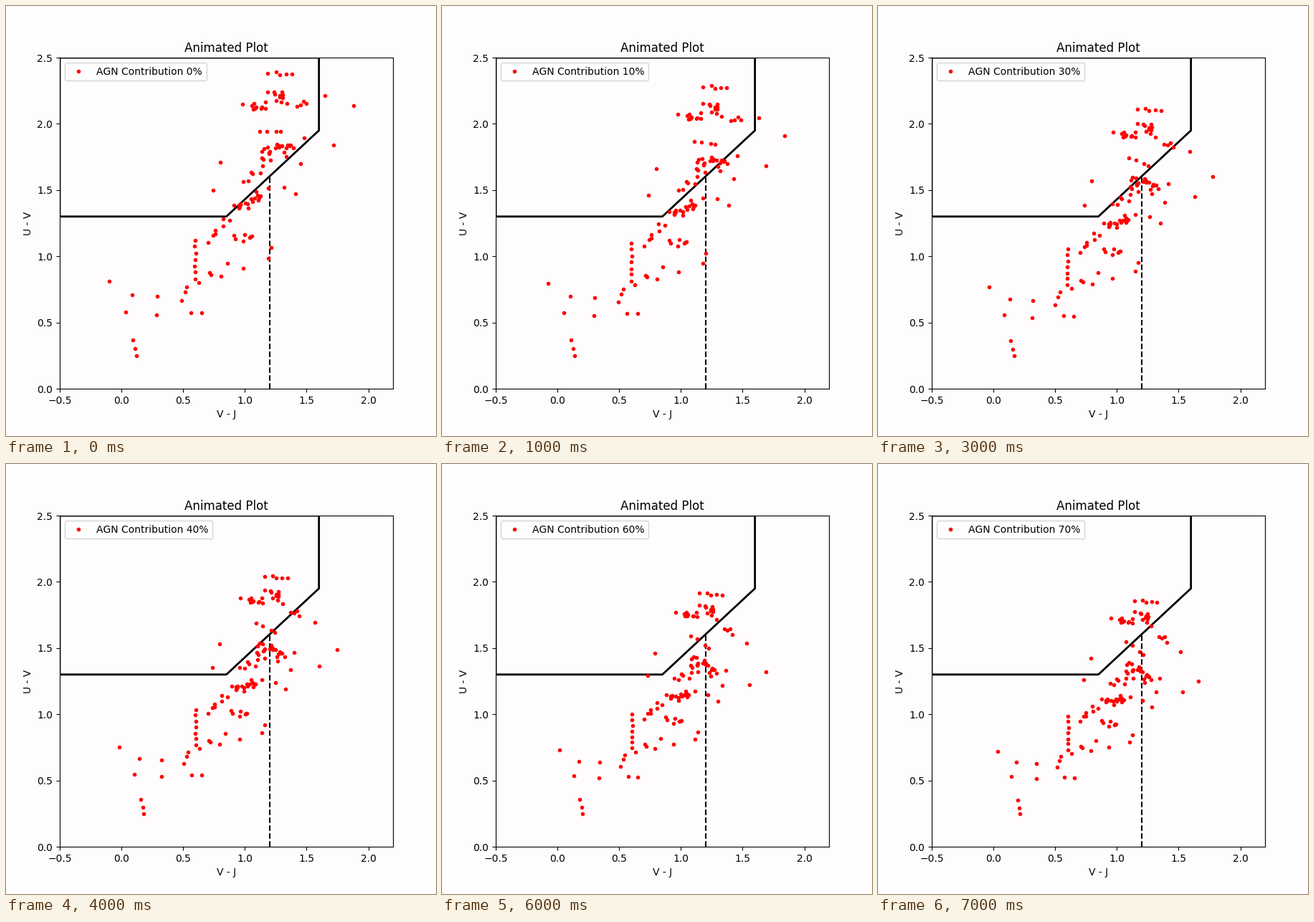
Recreate the animation shown at these times as a matplotlib script. Size 600 by 600 pixels, loop 8 s.

```python
import numpy as np
import matplotlib.pyplot as plt
from matplotlib.animation import FuncAnimation

BACK = "#fefcfd"
STEPS = 8
AGN_UV, AGN_VJ = 0.25, 0.668
rng = np.random.default_rng(4)

# Lone galaxies at the edges of the cloud, as (V - J, U - V)
LONERS = [(-0.10, 0.81), (0.74, 1.50), (0.80, 1.71), (1.88, 2.14),
          (1.72, 1.84), (1.65, 2.215), (1.48, 1.895), (1.45, 1.70),
          (1.41, 1.47), (1.315, 1.52), (1.215, 1.065), (1.19, 0.985)]


def streak(start, end, count, scatter=0.0):
    """Galaxies evenly spaced between two points, then scattered."""
    line = np.linspace(start, end, count)
    return line + scatter * rng.uniform(-1, 1, line.shape)


def sigmoid(t):
    return 1 / (1 + np.exp(-t))


def mix_rate(vj, uv):
    """AGN to galaxy flux ratio in V; dusty galaxies are overtaken sooner."""
    below = 0.8667 * vj + 0.563 - uv
    dusty = 0.29 * sigmoid((below + 0.25) / 0.1) * np.clip(vj - 0.55, 0, None)
    young = 0.07 * sigmoid((0.9 - uv) / 0.1)
    return 0.16 + dusty + young


VJ, UV = np.vstack([
    LONERS,
    # blue galaxies
    streak((0.085, 0.37), (0.12, 0.25), 3, 0.01),
    streak((0.035, 0.58), (0.085, 0.71), 2),
    streak((0.285, 0.56), (0.29, 0.70), 2),
    streak((0.56, 0.575), (0.65, 0.575), 2),
    # star-forming sequence
    streak((0.495, 0.665), (0.525, 0.775), 3, 0.01),
    streak((0.595, 0.83), (0.597, 1.12), 7, 0.005),
    streak((0.63, 0.83), (0.95, 0.92), 6, 0.05),
    streak((0.69, 1.13), (0.85, 1.28), 7, 0.03),
    streak((0.92, 1.14), (1.08, 1.14), 7, 0.03),
    # band along the quiescent border
    streak((0.95, 1.36), (1.14, 1.48), 18, 0.06),
    streak((1.00, 1.56), (1.10, 1.64), 5, 0.04),
    streak((1.12, 1.72), (1.37, 1.84), 22, 0.06),
    streak((1.11, 1.93), (1.30, 1.94), 4, 0.015),
    # quiescent clump
    streak((1.01, 2.14), (1.16, 2.14), 11, 0.03),
    streak((1.18, 2.22), (1.44, 2.13), 15, 0.06),
    streak((1.19, 2.38), (1.39, 2.37), 5, 0.015),
]).T
RATE = mix_rate(VJ, UV)


def blend(color, agn, share):
    """Colour of the summed light, relative to the V band."""
    flux = 10 ** (0.4 * color) + share * 10 ** (0.4 * agn)
    return 2.5 * np.log10(flux / (1 + share))


def colors_at(fraction):
    share = RATE * fraction
    return blend(VJ, AGN_VJ, share), -blend(-UV, -AGN_UV, share)


def label(step):
    return f"AGN Contribution {10 * step}%"


plt.rcParams.update({"font.family": "DejaVu Sans", "text.kerning_factor": 6})
fig, ax = plt.subplots(figsize=(6, 6), dpi=100, facecolor=BACK)
ax.set_facecolor(BACK)
ax.set(xlim=(-0.5, 2.2), ylim=(0, 2.5), title="Animated Plot",
       xlabel="V - J", ylabel="U - V")
ax.set_xticks(np.arange(-0.5, 2.1, 0.5))

# Quiescent region and the dusty divide
ax.plot([-0.5, -0.5, 0.85, 1.6, 1.6, -0.5], [2.5, 1.3, 1.3, 1.95, 2.5, 2.5],
        color="black", lw=2)
ax.plot([1.2, 1.2], [0, 1.6], color="black", ls="--", lw=1.5)
dots, = ax.plot(*colors_at(0), "r.", label=label(0))
legend = ax.legend(loc="upper left")


def update(step):
    dots.set_data(*colors_at(step / 10))
    legend.get_texts()[0].set_text(label(step))
    return dots, legend


anim = FuncAnimation(fig, update, frames=STEPS, interval=1000,
                     repeat=True, repeat_delay=0, blit=False)
plt.show()
```
